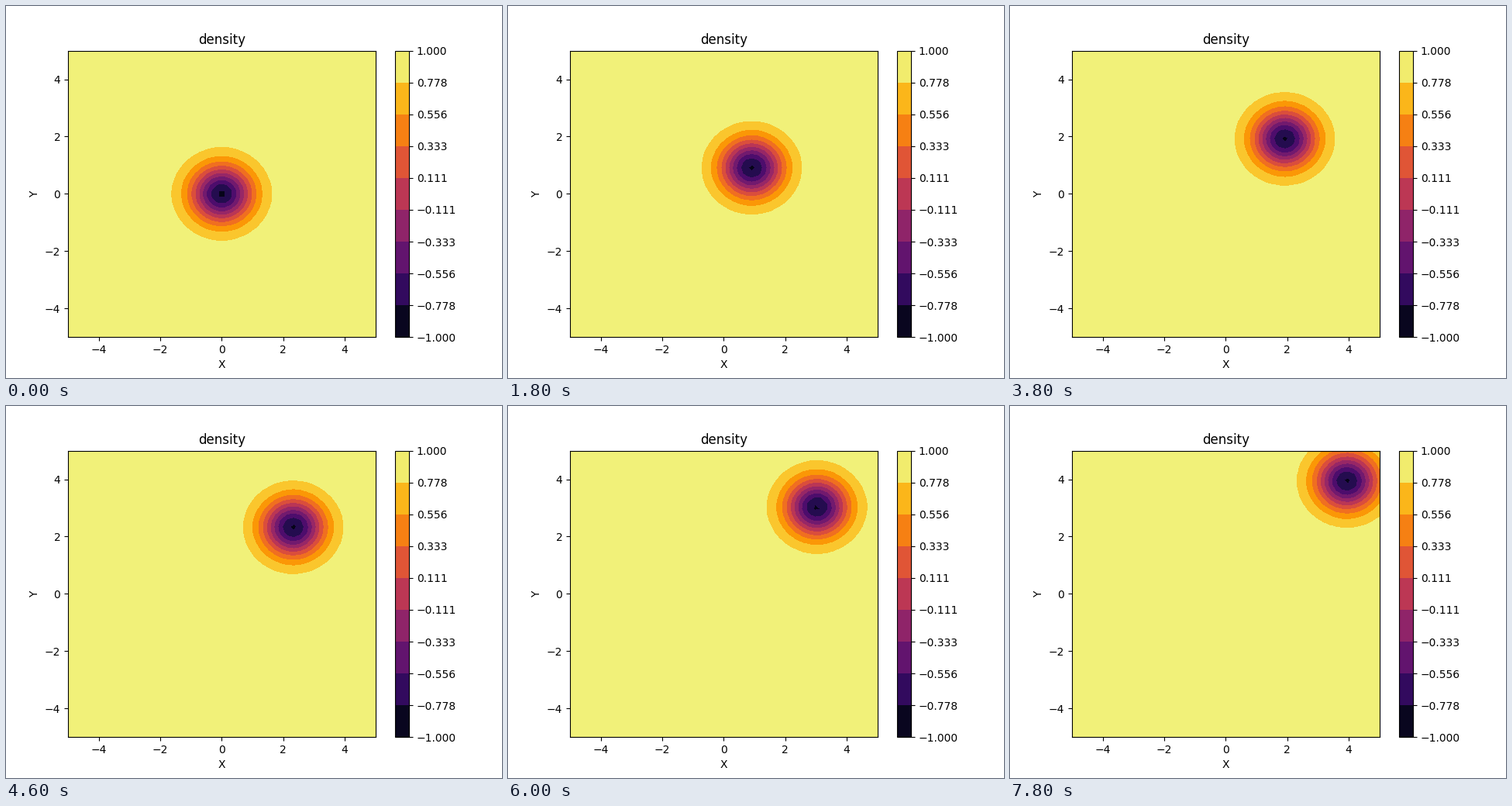
These frames come from a looping animation (640x480 px, 8 s). A matplotlib script:

```python
import numpy as np
import matplotlib.pyplot as plt
from matplotlib.animation import FuncAnimation

FRAMES = 40
INTERVAL = 200          # ms
STEP = 10 / 99          # drift per frame along both axes
DEPTH = 0.5925          # density drop at the vortex centre

axis = np.linspace(-5, 5, 50)
X, Y = np.meshgrid(axis, axis)
levels = np.linspace(0.36, 1.02, 12)

fig, ax = plt.subplots(figsize=(6.4, 4.8), dpi=100)
ax.set_title("density")
ax.set_xlabel("X")
ax.set_ylabel("Y")

# The colour scale spans -1..1, independent of the density levels
scale = ax.contourf(X, Y, np.zeros_like(X), np.linspace(-1, 1, 10),
                    cmap="inferno")
fig.colorbar(scale, ax=ax)
scale.remove()

current = []


def density(centre):
    return 1 - DEPTH * np.exp(-(X - centre) ** 2 - (Y - centre) ** 2)


def draw(i):
    while current:
        current.pop().remove()
    current.append(ax.contourf(X, Y, density(i * STEP), levels,
                               cmap="inferno"))
    return current


anim = FuncAnimation(fig, draw, frames=FRAMES, interval=INTERVAL,
                     init_func=lambda: draw(0), repeat=True, repeat_delay=0)
plt.show()
```
